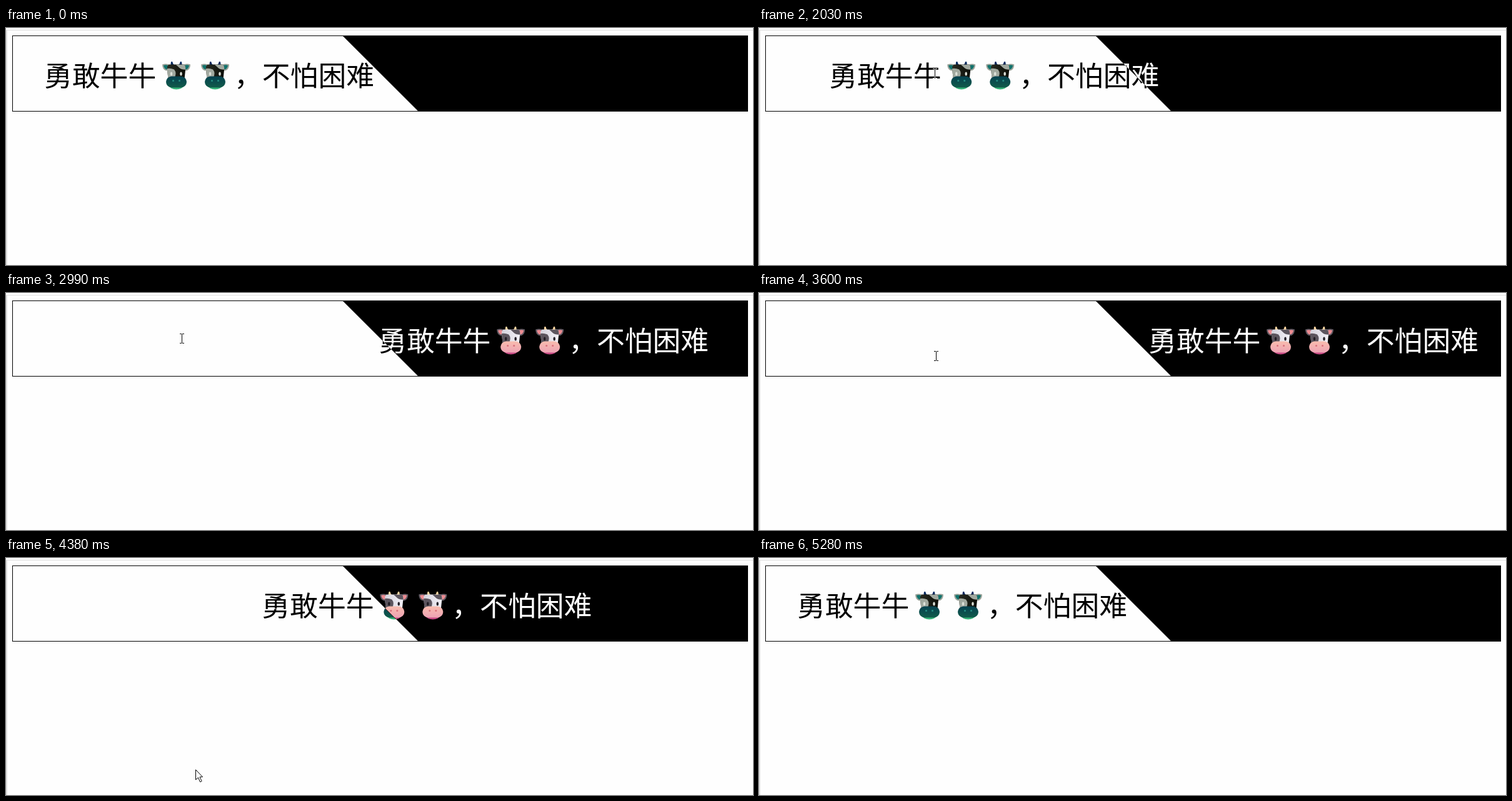
Animation of 1195x380 px, one loop 6.09 s. Source, as an HTML page:

```html
<!DOCTYPE html>
<html lang="zh-CN">
<head>
<meta charset="utf-8">
<title>勇敢牛牛</title>
<style>
  html, body { margin: 0; width: 100%; height: 100%; overflow: hidden; background: #fefefe; }
  svg { display: block; }
  .invert { mix-blend-mode: difference; }
  text { font: 44.8px "Noto Sans CJK SC", "Noto Sans CJK", sans-serif; fill: #fff; white-space: pre; }
</style>
</head>
<body>
<svg width="1195" height="380" viewBox="0 0 1195 380">
  <defs>
    <linearGradient id="nose" x2="0" y2="1">
      <stop offset="0" stop-color="#f9bcae"/>
      <stop offset="1" stop-color="#eda3b4"/>
    </linearGradient>
    <linearGradient id="hide" x2="1" y2="0">
      <stop offset="0" stop-color="#d5d3dd"/>
      <stop offset="1" stop-color="#f2f0f6"/>
    </linearGradient>
    <clipPath id="face"><path id="head" d="M11 5H34Q38 6 37 14L35 33H10L8 14Q7 6 11 5Z"/></clipPath>
    <g id="ear">
      <path d="M11 5Q5 3 0 5Q0 13 6 15Q10 15 12 11Z" fill="#625b64"/>
      <path d="M10 7Q6 5 2 6.500Q3 12 7 13Q9 12 10 7Z" fill="#ee8c92"/>
    </g>
    <path id="horn" d="M18 9Q12 8 14 1Q15 -.5 16.500 1Q17 5 20 6Z" fill="#f8d5a0"/>
    <g id="cow">
      <use href="#ear"/>
      <use href="#ear" transform="matrix(-1 0 0 1 45 0)"/>
      <use href="#horn"/>
      <use href="#horn" transform="matrix(-1 0 0 1 45 0)"/>
      <use href="#head" fill="url(#hide)"/>
      <g clip-path="url(#face)" fill="#5c555e">
        <path d="M6 12Q12 10 19 13Q24 19 19 27L15 36H5Z"/>
        <path d="M20 4H40V13Q31 14 27 10Q24 7 20 4Z"/>
      </g>
      <ellipse cx="14.500" cy="20" rx="1.700" ry="3" fill="#211d25"/>
      <ellipse cx="30" cy="20" rx="1.700" ry="3" fill="#211d25"/>
      <ellipse cx="22.500" cy="39" rx="11" ry="6" fill="#c94b86"/>
      <rect x="6" y="24" width="33" height="18" rx="9" fill="url(#nose)"/>
      <circle cx="17.500" cy="31" r="1.500" fill="#d9707c"/>
      <circle cx="27.500" cy="31" r="1.500" fill="#d9707c"/>
    </g>
  </defs>

  <rect width="1195" height="380" fill="#fefefe"/>
  <rect y="3" width="1195" height="1" fill="#dedede"/>
  <rect y="3" width="2" height="377" fill="#e0e0e0"/>
  <rect x="10.500" y="12.500" width="1176" height="121" fill="#fefefe" stroke="#000"/>
  <path d="M538.500 12.500H1187V134H660Z"/>

  <g id="line" class="invert">
    <text x="61" y="93">勇敢牛牛</text>
    <use href="#cow" x="250" y="53.500"/>
    <use href="#cow" x="312" y="53.500"/>
    <text x="365" y="93">，不怕困难</text>
  </g>

  <path id="beam" class="invert" fill="none" stroke="#fff"
    d="M-3 -7.500H0M1 -7.500H4M.5 -7V7M-3 7.500H0M1 7.500H4"/>
  <path id="arrow" fill="#fff" stroke="#000"
    d="M.5 .5V16.500L4.500 13L7.500 20L9.500 19.500L10 18.500L7 12H11.500Z"/>
</svg>
<script>
  const LOOP = 6090, TICK = 60, TRAVEL = 562;
  const $ = id => document.getElementById(id);
  const line = $("line"), beam = $("beam"), arrow = $("arrow");

  // [time, progress] of the hover transition, out and back
  const out = [[1730, 0], [1970, .156], [2030, .211], [2510, .545], [2570, .545],
    [2630, .6], [2990, .846], [3230, 1]];
  const back = [[3760, 0], [4080, .211], [4140, .267], [4680, .633], [4800, .733], [5230, 1]];

  // [time, x, y] of the pointer
  const pointer = [[1370, 312, 358], [1730, 288, 128], [1850, 281, 73], [3480, 281, 73],
    [3750, 286, 136], [4080, 295, 263], [4140, 295, 263], [4380, 303, 339]];

  function along(keys, t, k = 1) {
    const i = keys.findIndex(key => key[0] > t);
    if (i === 0) return keys[0][k];
    if (i < 0) return keys[keys.length - 1][k];
    const a = keys[i - 1], b = keys[i];
    return a[k] + (b[k] - a[k]) * (t - a[0]) / (b[0] - a[0]);
  }

  // cubic-bezier(.42, 0, .58, 1)
  function easeInOut(x) {
    let lo = 0, hi = 1;
    for (let i = 0; i < 24; i++) {
      const s = (lo + hi) / 2;
      if (1.26 * s - .78 * s * s + .52 * s ** 3 < x) lo = s; else hi = s;
    }
    return lo * lo * (3 - 2 * lo);
  }

  function place(node, x, y, shown) {
    node.setAttribute("transform", `translate(${Math.round(x)} ${Math.round(y)})`);
    node.setAttribute("visibility", shown ? "visible" : "hidden");
  }

  function draw(now) {
    const time = now % LOOP;
    const base = time < 3540 ? 1370 : 3540;
    const t = base + Math.floor((time - base) / TICK + 1e-6) * TICK;

    const shift = TRAVEL * (easeInOut(along(out, t)) - easeInOut(along(back, t)));
    line.setAttribute("transform", `translate(${shift.toFixed(2)} 0)`);

    const x = along(pointer, t), y = along(pointer, t, 2);
    const visible = t >= 1370 && t < 4440;
    const onText = y < 106;
    place(beam, x, y, visible && onText);
    place(arrow, x, y, visible && !onText);
  }

  const start = performance.now();
  function frame() {
    draw(performance.now() - start);
    requestAnimationFrame(frame);
  }
  frame();
</script>
</body>
</html>
```
